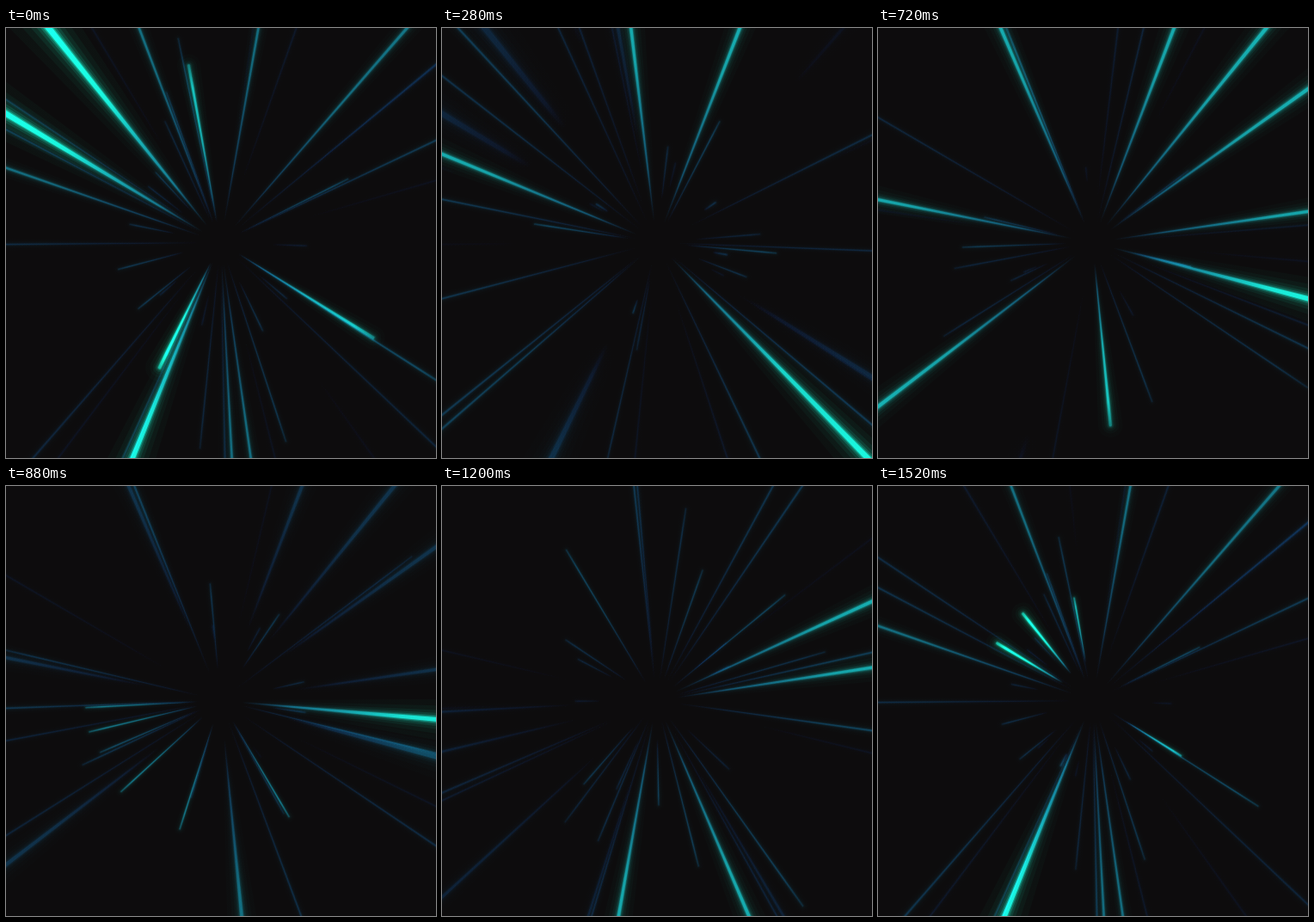
Animation, 500 px wide and 500 px high, one loop 1560 ms. Source, as an HTML page with a canvas:

```html
<!DOCTYPE html>
<html lang="en">
<head>
<meta charset="utf-8">
<title>Light speed</title>
<style>
  html, body { margin: 0; width: 100%; height: 100%; overflow: hidden; background: #0d0c0d; }
  canvas { display: block; width: 500px; height: 500px; }
</style>
</head>
<body>
<canvas id="stage" width="500" height="500"></canvas>
<script>
const ctx = document.getElementById('stage').getContext('2d');
const LOOP = 1560, STEP = 40, CENTER = 249.5, EDGE = 390;
const LAYERS = 7;

const streaks = [];
const volley = (start, power, ...angles) =>
  angles.forEach(angle => streaks.push({ angle, start, power }));

// Bright streaks fired in volleys; start is when the heads are 100px out
volley(160, .68, -157.6, -96.8, -68.8);
volley(172, .86, 45.6);
volley(295, .92, -34.2, 9.8, -147.4);
volley(300, .66, 108.5);
volley(570, .67, 142.6, -51, -69.2, -113.2, -8.2, -35.5, -168.7);
volley(625, .92, 14.6);
volley(662, .72, 84.4);
volley(785, .9, 5);
volley(800, .45, 177, 107.6, 137.5, 59.5, 166.6);
volley(1050, .68, -8.7, 66.8, -24.7, 100);
volley(1340, .46, -160.8, -110.8, -80, -49, 82, 87);
volley(1440, .92, 112.2);
volley(1500, .7, -100.2, 31.9);
volley(1504, .96, -128.7, -149);
volley(1533, .96, 116);

// Dim streaks spread evenly around the centre
let seed = 77;
const rand = () => (seed = (seed * 16807) % 2147483647) / 2147483647;
for (let i = 0; i < 64; i++) {
  volley(rand() * LOOP, .13 + .16 * rand(), i * 137.5 + rand() * 12);
}

const clamp = (v, lo = 0, hi = 1) => Math.min(hi, Math.max(lo, v));

// Weak light is blue, strong light cyan
const tint = (e, a, green = 1, blue = 1) =>
  `rgba(${14 * e | 0},${255 * e ** 1.25 * green | 0},${232 * e ** .85 * blue | 0},${a})`;

function wedge(r0, r1, h0, h1) {
  ctx.beginPath();
  ctx.moveTo(r0, -h0);
  ctx.lineTo(r1, -h1);
  ctx.arc(r1, 0, h1, -Math.PI / 2, Math.PI / 2);
  ctx.lineTo(r0, h0);
  ctx.closePath();
  ctx.fill();
}

function drawStreak({ angle, start, power }, time) {
  const age = (time - start + 200 + 2 * LOOP) % LOOP - 200;
  const span = 70 + 500 * (1 - power) ** 2;
  const u = age / span;
  if (u < -.3) return;

  // Full light until shortly after the head has left the stage
  const after = Math.max(0, age - span * .85);
  const e = power * clamp((u + .3) / .5) * Math.exp(-Math.max(0, after - 80) / 110);
  if (e < .03) return;

  const head = u < .74 ? 100 / (1 - u) : EDGE;
  const young = 24 + 90 * Math.max(0, .4 - u);
  const tail = Math.min(young * Math.exp(Math.max(0, after - 60) / 110), head * .8);
  if (tail > EDGE * .78) return;

  const slope = .003 + .012 * power * power;
  const h0 = Math.max(.4, tail * slope);
  const h1 = Math.max(.9, head * slope);

  ctx.save();
  ctx.rotate(angle * Math.PI / 180);
  for (let i = 0; i < LAYERS; i++) {
    const width = .75 * 1.46 ** i;
    const alpha = .42 * .64 ** i;
    const blue = 1 - .05 * i;
    const fill = ctx.createLinearGradient(tail, 0, head + h1, 0);
    fill.addColorStop(0, tint(e, 0, .5, blue));
    fill.addColorStop(.16, tint(e, alpha * .55, .7, blue));
    fill.addColorStop(.5, tint(e, alpha * .9, .95, blue));
    fill.addColorStop(.85, tint(e, alpha, 1, blue));
    fill.addColorStop(1, tint(e, head < EDGE ? alpha * .6 : alpha, 1, blue));
    ctx.fillStyle = fill;
    wedge(tail, head, h0 * width, h1 * width);
  }
  ctx.restore();
}

function draw(time) {
  ctx.globalCompositeOperation = 'source-over';
  ctx.fillStyle = '#0d0c0d';
  ctx.fillRect(0, 0, 500, 500);
  ctx.globalCompositeOperation = 'lighter';
  ctx.save();
  ctx.translate(CENTER, CENTER);
  for (const s of streaks) drawStreak(s, time);
  ctx.restore();
}

const begin = performance.now();
function tick() {
  const time = (performance.now() - begin) % LOOP;
  draw(Math.floor(time / STEP) * STEP);
  requestAnimationFrame(tick);
}
tick();
</script>
</body>
</html>
```
